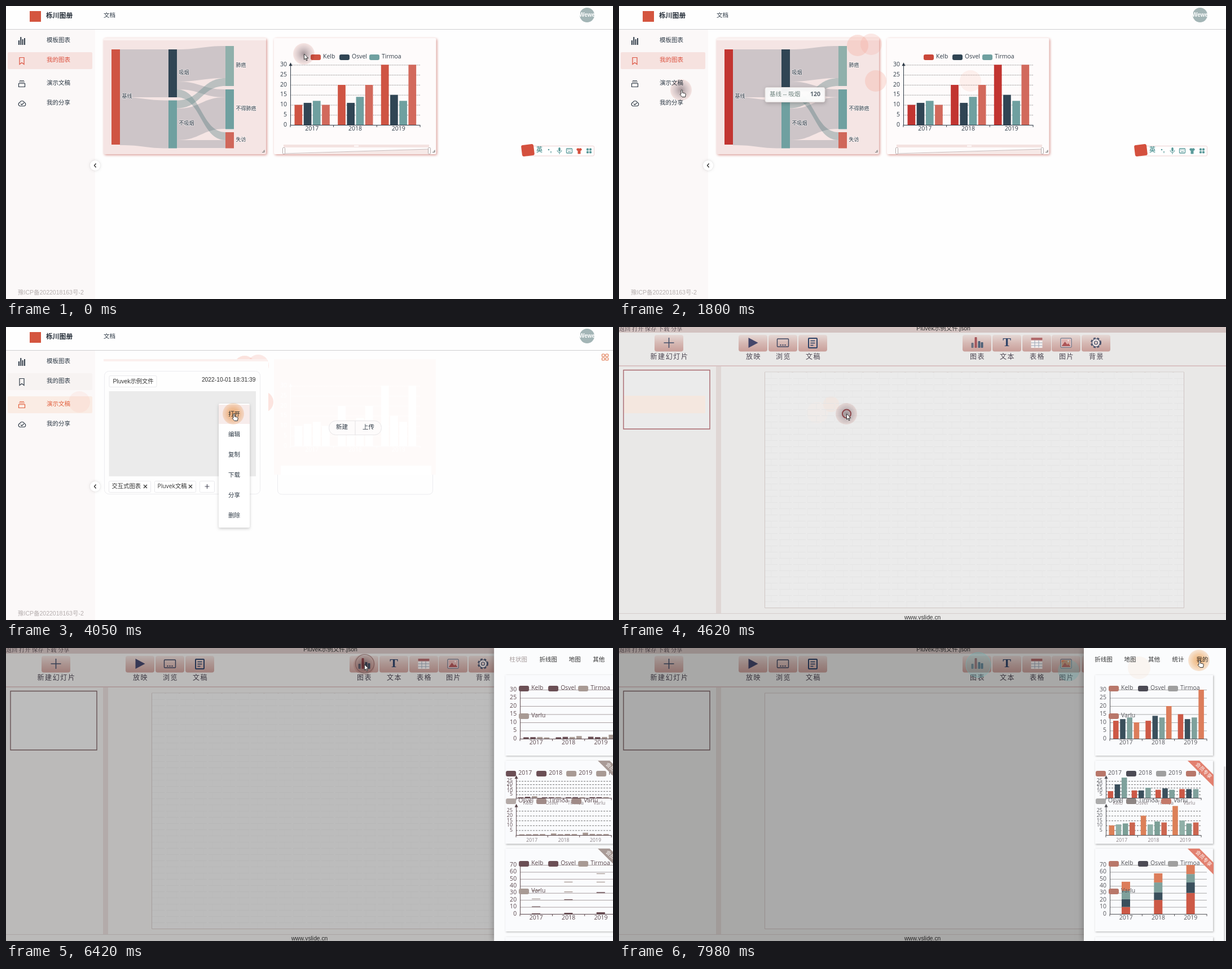
Write an HTML page with a canvas that moves like this. It is 1076 px wide and 520 px high and loops after 8 s.

```html
<!DOCTYPE html>
<html lang="zh">
<head>
<meta charset="utf-8">
<style>
html, body { margin: 0; width: 100%; height: 100%; overflow: hidden; background: #fefefe; }
canvas { display: block; }
</style>
</head>
<body>
<canvas id="stage" width="1076" height="520"></canvas>
<script>
const ctx = document.getElementById('stage').getContext('2d');
const LOOP = 8000;
const SANS = '"Open Sans", "Noto Sans CJK SC", "Noto Sans CJK", sans-serif';
const ARIAL = '"Liberation Sans", "Noto Sans CJK SC", "Noto Sans CJK", sans-serif';
const BRANDS = ['Kelb', 'Osvel', 'Tirmoa', 'Varlu'];
const YEARS = ['2017', '2018', '2019'];
const APP = 'Pluvek';
const INK = '#2f3b47', RED = '#cf5443', TEAL = '#6fa0a0', DARK = '#304554';

// ---- drawing helpers ----
function rect(x, y, w, h, fill, r = 0, stroke, lw = 1) {
  ctx.beginPath();
  ctx.roundRect(x, y, w, h, r);
  paint(fill, stroke, lw);
}
function circle(x, y, r, fill, stroke, lw = 1) {
  ctx.beginPath();
  ctx.arc(x, y, r, 0, 7);
  paint(fill, stroke, lw);
}
function paint(fill, stroke, lw) {
  if (fill) { ctx.fillStyle = fill; ctx.fill(); }
  if (stroke) { ctx.strokeStyle = stroke; ctx.lineWidth = lw; ctx.stroke(); }
}
function line(x1, y1, x2, y2, color, lw = 1, dash = []) {
  ctx.setLineDash(dash);
  ctx.beginPath();
  ctx.moveTo(x1, y1);
  ctx.lineTo(x2, y2);
  paint(null, color, lw);
  ctx.setLineDash([]);
}
function path(d, x, y, fill, stroke, lw = 1) {
  ctx.save();
  ctx.translate(x, y);
  const p = new Path2D(d);
  if (fill) { ctx.fillStyle = fill; ctx.fill(p); }
  if (stroke) { ctx.strokeStyle = stroke; ctx.lineWidth = lw; ctx.stroke(p); }
  ctx.restore();
}
function text(s, x, y, size = 10.5, color = INK, { align = 'left', font = SANS, weight = '', gap = 0 } = {}) {
  ctx.font = `${weight} ${size}px ${font}`;
  ctx.textAlign = align;
  ctx.textBaseline = 'middle';
  ctx.letterSpacing = gap + 'px';
  ctx.fillStyle = color;
  ctx.fillText(s, x, y);
  ctx.letterSpacing = '0px';
}
function shadowed(color, blur, dx, dy, draw) {
  ctx.save();
  Object.assign(ctx, { shadowColor: color, shadowBlur: blur, shadowOffsetX: dx, shadowOffsetY: dy });
  draw();
  ctx.restore();
}
const clamp = v => Math.max(0, Math.min(1, v));

// ---- bar charts ----
function chart(o) {
  const { x, w, base, unit, max, step, cats, rows, colors, grow = 1, ink = INK, grid = '#a3a3a3', size = 10.5 } = o;
  const top = base - max * unit, catW = w / cats.length;
  for (let v = o.from || 0; v <= (o.labelMax || max); v += step) {
    const y = base - v * unit;
    if (v) line(x, y + .5, x + w, y + .5, grid, 1, o.dash || [2, 1]);
    text(v, x - 6, y, size, ink, { align: 'right' });
  }
  rows.forEach((row, i) => {
    let stacked = 0;
    row.forEach((v, j) => {
      const h = v * unit * grow;
      const left = x + i * catW + o.offset + (o.stack ? 0 : j * o.pitch);
      rect(left, base - stacked * unit - h, o.barW, h, colors[j]);
      if (o.stack) stacked += v;
    });
    text(cats[i], x + (i + .5) * catW, base + (o.catDy || 7), o.catSize || size, o.catInk || ink, { align: 'center' });
  });
  line(x, base + .5, x + w, base + .5, ink);
  line(x + .5, top, x + .5, base, ink);
  for (let i = 0; i <= cats.length; i++) line(x + i * catW, base, x + i * catW, base + 4, ink);
  if (o.arrow) path('M-3 2L0 -4L3 2Z', x + .5, top, ink);
}
function legend(items, xs, y, colors, ink) {
  items.forEach((s, i) => {
    rect(xs[i], y - 5, 18, 10, colors[i], 3);
    text(s, xs[i] + 22, y - .5, 10.5, ink);
  });
}
const pageChart = {
  x: 504, w: 230, base: 211, unit: 3.555, max: 30, step: 5, cats: YEARS, arrow: true,
  rows: [[10, 11, 12, 10], [20, 11, 14, 20], [30, 15, 12, 30]], barW: 13.7, pitch: 16.2, offset: 7.5
};

// ---- sankey: node = x, y, height, colour, label; link = from, y, to, y, thickness ----
const NODES = [
  [187, 77, 169, RED, '基线'], [288, 77, 85, DARK, '吸烟'], [288, 167.5, 85, TEAL, '不吸烟'],
  [389, 71, 71, '#8fb0ab', '肺癌'], [389, 148, 70.5, TEAL, '不得肺癌'], [389, 224, 28.5, '#d0675a', '失访']
];
const LINKS = [
  [0, 77, 1, 77, 85], [0, 162, 2, 167.5, 85], [1, 77, 3, 71, 57], [1, 134, 4, 148, 14],
  [1, 148, 5, 224, 14], [2, 167.5, 3, 128, 14], [2, 182, 4, 162, 56], [2, 238, 5, 238, 14]
];
function sankey(t) {
  const hover = t >= 600 && t < 1000;
  LINKS.forEach(([a, y1, b, y2, h], i) => {
    const x1 = NODES[a][0] + 15, x2 = NODES[b][0], m = (x1 + x2) / 2;
    const tint = !hover && (i === 4 || i === 5);
    ctx.globalAlpha = hover && b !== 3 ? .04 : 1;
    path(`M${x1} ${y1}C${m} ${y1} ${m} ${y2} ${x2} ${y2}V${y2 + h}C${m} ${y2 + h} ${m} ${y1 + h} ${x1} ${y1 + h}Z`,
      0, 0, tint ? 'rgba(105,140,140,.42)' : 'rgba(49,69,84,.2)');
  });
  NODES.forEach(([x, y, h, color, label], i) => {
    ctx.globalAlpha = hover && ![1, 2, 3].includes(i) ? .08 : 1;
    const fill = i === 0 && t >= 100 ? '#c23531' : i === 3 && hover ? '#a9d0bb' : color;
    rect(x, y, 15, h, fill);
    ctx.strokeStyle = 'rgba(255,255,255,.6)';
    ctx.lineWidth = 1.5;
    ctx.font = `9px ${SANS}`;
    ctx.textAlign = 'left';
    ctx.textBaseline = 'middle';
    ctx.strokeText(label, x + 18.5, y + h / 2 - 1);
    text(label, x + 18.5, y + h / 2 - 1, 9);
  });
  ctx.globalAlpha = 1;
}
function tooltip(x, y, w, label, value, border) {
  shadowed('rgba(0,0,0,.2)', 6, 1, 2, () => rect(x, y, w, 26, 'rgba(255,255,255,.95)', 3, border));
  text(label, x + 8, y + 12.5, 10.5, '#6d807c');
  text(value, x + w - 8, y + 12.5, 10.5, '#5c6670', { align: 'right', weight: 'bold' });
}

// ---- dashboard pages ----
function frameParts(t) {
  const slides = t >= 2200;
  rect(0, 0, 1076, 520, '#fefefe');
  rect(0, 42, 158, 478, '#fbf8f8');
  line(0, 41.5, 1076, 41.5, '#cfcfd1');
  rect(42, 9, 20, 19, '#d4553f');
  text('栎川图册', 71, 18, 11.8, '#222b36', { weight: 'bold' });
  text('文档', 173, 17);
  circle(1030, 16, 13, '#a3b5b6');
  text('Wewe', 1030, 16, 10, '#fff', { align: 'center', font: ARIAL, weight: 'bold' });

  const active = '#dc5340';
  if (t < 2720) rect(3, 82, 150, 30, '#f6e2df', 2);
  else {
    rect(3, 82, 150, 30, '#f7f3f2', 2);
    rect(3, 123, 150, 30, '#faece4', 2);
  }
  const mineInk = slides ? INK : active, slideInk = slides ? '#e2613f' : INK;
  text('模板图表', 72, 61.5);
  text('我的图表', 72, 96.5, 10.5, mineInk);
  text('演示文稿', 72, 137, 10.5, slideInk);
  text('我的分享', 72, 172);
  path('M0 6h2v8h-2zM3.3 0h2v14h-2zM6.6 4h2v10h-2zM10 2h2v12h-2z', 22, 55, INK);
  path('M.5 .5h8v12l-4 -3l-4 3z', 23.5, 91, null, mineInk, 1.2);
  path('M2 .5h8M1 3h10M.5 5.5h11v6h-11z', 22, 132, null, slideInk, 1.2);
  path('M3.5 10.5a3.3 3.3 0 0 1 0 -6.3a4.3 4.3 0 0 1 8 0a3.3 3.3 0 0 1 0 6.3zM5 6.5l2 2l3.5 -3.5', 21, 167, null, INK, 1.2);
  text('豫ICP备2022018163号-2', 21, 509, 10.5, '#b5aeae', { font: ARIAL });
  shadowed('rgba(0,0,0,.15)', 4, 0, 0, () => circle(158, 283, 9, '#fff'));
  path('M3 0L0 3.5L3 7', 156.5, 279.5, null, '#222', 1.2);
}
function inputBar(t) {
  rect(922, 248.5, 120.5, 17.5, '#fff', 2, '#ecd0d0');
  ctx.save();
  ctx.translate(925, 256);
  ctx.rotate(-.12);
  rect(-11, -10, 22, 20, '#d4503e', 3);
  ctx.restore();
  const c = '#5b9a9a';
  text('英', 940, 256.5, 11, c, { weight: 'bold' });
  circle(962, 255, 1.3, c);
  path('M0 0h2l-1 4z', 965, 258, c);
  rect(979.3, 251, 3.5, 7, c, 2);
  path('M0 4a3.8 3.8 0 0 0 7.6 0M3.8 8v3', 977.2, 252, null, c, 1.1);
  rect(993.5, 253, 10, 8, null, 1, c, 1.3);
  line(995, 255.5, 1002, 255.5, c, 1, [1.5, 1]);
  line(996, 258.5, 1001, 258.5, c);
  path('M3 0q2 2 4 0l3 2l-1.5 3l-1 -.5v6h-5v-6l-1 .5l-1.5 -3z', 1011, 252, t < 500 ? '#d4503e' : t < 1000 ? '#888' : c);
  for (let i = 0; i < 4; i++) rect(1029 + i % 2 * 5, 252.5 + (i >> 1) * 5, 4, 4, c, 1.3);
}
function trail(x, y, alpha) { circle(x, y, 19, `rgba(243,165,150,${alpha})`); }
function pathTrails() { trail(423, 70, .32); trail(447, 68, .24); trail(455, 133, .3); }

function resizeCorner(x, y) { path('M0 4h4V0M2 2h2', x, y, null, '#777'); }
function chartsPage(t) {
  const shade = 'rgba(190,80,70,.6)';
  shadowed(shade, 4, 1.5, 1.5, () => rect(173, 57, 288, 206, '#f5e5e4', 2));
  rect(173, 57, 288, 4, '#fbf3f2');
  shadowed(shade, 4, 1.5, 1.5, () => rect(475, 57, 287.5, 206, '#fefbfb', 2));
  sankey(t);
  resizeCorner(454, 255.5);
  resizeCorner(756, 255.5);

  const red = t < 100 ? RED : '#c23531';
  chart({ ...pageChart, colors: [red, DARK, TEAL, '#d2695c'] });
  legend(BRANDS.slice(0, 3), [540, 591, 644], 91, [t < 100 ? RED : '#ca4739', DARK, TEAL], INK);
  rect(492, 246, 258, 5, '#f4e3e1');
  rect(617, 247.5, 8, 2, '#fff');
  path('M492 263L750 254V263Z', 0, 0, '#f6e9e7');
  line(492, 262, 750, 254, '#c9bdbd');
  rect(490.5, 251.5, 4, 11, '#fff', 1, '#b5aaaa');
  rect(748.5, 251.5, 4, 11, '#fff', 1, '#b5aaaa');
  inputBar(t);
  if (t >= 500) pathTrails();
  if (t >= 1500) trail(623, 133, .15);
  if (t >= 600 && t < 1000) tooltip(242, 182.5, 70, '肺癌', '100', '#a9d0bb');
  if (t >= 1600) tooltip(259, 144.5, 106, '基线 -- 吸烟', '120', '#e3dcdb');
}
function tag(label, x, w) {
  rect(x + .5, 273.5, w, 20, '#fff', 2, '#e9e9ec');
  text(label, x + 5.5, 283, 10.3, '#333');
  path('M0 0l6 6M6 0l-6 6', x + w - 12, 280, null, '#333', 1.2);
}
function slidesPage(t) {
  pathTrails();
  rect(173, 61, 292, 120, '#fefefe');
  rect(173, 57, 290, 4, '#fbf0ee');
  rect(475, 57, 287, 205, '#fefaf9');
  chart({ ...pageChart, ink: '#fff', grid: '#fff', colors: Array(4).fill('#fff') });
  rect(487, 246, 267, 20, '#fff');
  rect(481.5, 262, 275, 35, '#fefefe', [0, 0, 8, 8]);
  path('M0 0V27Q0 35 8 35H267Q275 35 275 27V0', 481.5, 262, null, '#ececef');
  rect(572.5, 166.5, 93, 25, '#fdfbfb', 12, '#e8e6e8');
  line(619, 167, 619, 191, '#e4e2e4');
  text('新建', 585, 178.5);
  text('上传', 632, 178.5);
  for (let i = 0; i < 4; i++) rect(1056.5 + i % 2 * 6.5, 48 + (i >> 1) * 6.5, 4.5, 4.5, null, 1, '#e0784f', 1.2);

  rect(174.5, 78.5, 276, 218, '#fefefe', 8, '#ececef');
  rect(183, 86.5, 84, 20, '#fff', 2, '#e9e9ec');
  text(APP + '示例文件', 189.5, 97, 10.3, '#333', { font: ARIAL });
  text('2022-10-01 18:31:39', 442.5, 94, 10.3, '#333', { font: ARIAL, align: 'right' });
  rect(182.5, 114, 260.5, 151, '#ebebeb');
  tag('交互式图表', 182, 74);
  tag(APP + '文稿', 263, 73);
  rect(343.5, 273.5, 26, 20, '#fff', 2, '#e9e9ec');
  path('M4 0v8M0 4h8', 352.5, 279, null, '#445', 1.1);
  trail(130, 133, .12);
  if (t < 3100) circle(108.5, 133, 15.5, null, '#e8837a', 2);
  if (t >= 3650) {
    shadowed('rgba(0,0,0,.2)', 5, 0, 2, () => rect(377, 136, 55, 220, '#fff', 2));
    if (t >= 3750) rect(377, 138, 55, 34, '#f7eceb');
    ['打开', '编辑', '复制', '下载', '分享', '删除'].forEach((s, i) => text(s, 404.5, 155 + i * 36, 10.5, INK, { align: 'center' }));
  }
}

// ---- slide editor ----
const TOOLS = [
  [63, '新建幻灯片', c => path('M0 -9V9M-9 0H9', c, 28, null, '#44506a', 1.6)],
  [212, '放映', c => path('M-8 -9L9 0L-8 9Z', c, 28, '#44466a')],
  [265, '浏览', c => {
    rect(c - 10, 21, 20, 14, null, 1, '#3c4560', 1.4);
    line(c - 5, 32, c + 6, 32, '#3c4560', 2, [2, 2]);
  }],
  [318, '文稿', c => {
    rect(c - 7.5, 20, 15, 17, null, 1, '#2f4468', 2);
    path('M-4 -4h8M-4 0h8M-4 4h5', c, 28.5, null, '#2f4468', 1.6);
  }],
  [609, '图表', c => [[-9, 9, '#6a7080'], [-3, 19, '#a5545a'], [3, 12, '#4d6078'], [8, 10, '#4d6078']].forEach(
    ([dx, h, f]) => rect(c + dx - 1, 37 - h, 4, h, f, 1))],
  [662, '文本', c => text('T', c, 28.5, 22, '#2f4468', { align: 'center', font: '"Liberation Serif", serif', weight: 'bold' })],
  [715, '表格', c => {
    rect(c - 10, 19, 20, 18, '#f4efee');
    rect(c - 10, 19, 20, 4.5, '#b0696b');
    path('M-10 0h20M-10 5h20M-3.5 -4.5v13M3.5 -4.5v13', c, 28, null, '#9aa5b5');
  }],
  [767, '图片', (c, bright) => {
    rect(c - 9.5, 20, 19, 16, '#f1e6e5', 1, '#4d5670');
    rect(c - 8, 21.5, 16, 13, bright ? '#e8845a' : '#dfb3b0');
    path('M-8 6L-2 -2L2 3L4 1L8 6Z', c, 28, bright ? '#ca3c34' : '#ad5557');
    circle(c + 4, 24, 1.5, '#f4e6e2');
  }],
  [820, '背景', c => {
    ctx.setLineDash([4, 3]);
    circle(c, 28, 8.5, null, '#45506a', 2);
    ctx.setLineDash([]);
    circle(c, 28, 7, '#f0e6e5', '#45506a', 1.2);
    circle(c, 28, 3, '#e2cbc8', '#45506a', 1.2);
  }]
];
function bricks() {
  for (let row = 0; row < 38; row++) {
    const y = 80.5 + row * 11;
    line(259, y, 1001, y, '#e4e4e4', 1, [22, 3]);
    for (let x = 270 + row % 2 * 16; x < 1000; x += 32) line(x, y, x, Math.min(y + 11, 498), '#e7e7e7');
  }
}
function editor(t) {
  const label = { font: ARIAL, align: 'center' };
  rect(0, 0, 1076, 520, '#e9e8e7');
  rect(0, 0, 1076, 10, '#d3c3c1');
  text('返回 打开 保存 下载 分享', 0, 3, 10.2, '#4d4048', { font: '"Noto Serif CJK SC", "Noto Sans CJK SC", "Noto Sans CJK", serif' });
  text(APP + '示例文件.json', 575, 3.5, 10.5, '#333', label);
  const skin = ctx.createLinearGradient(0, 14, 0, 43);
  skin.addColorStop(0, '#e5d8d5');
  skin.addColorStop(.5, '#d6b9b4');
  skin.addColorStop(1, '#c99f9a');
  for (const [x, name, icon] of TOOLS) {
    rect(x, 14, 51, 29.5, skin, 4);
    icon(x + 25.5, t >= 7020);
    text(name, x + 26.5, 53.5, 12, '#4b4450', { align: 'center', gap: 1.6 });
  }
  line(0, 69, 1076, 69, '#c9a09f', 1.2);
  rect(172, 70, 9, 438, '#dfd6d4');
  rect(258.5, 80, 743, 418.5, '#ebebeb', 0, '#cfc5c3');
  rect(8, 76.5, 153, 104.5, '#ebebeb', 0, t < 6220 ? '#a9676d' : '#7f6668', 1.4);
  if (t < 5000) {
    rect(9, 122, 144, 31, '#f4e7df');
    circle(352, 152, 19, '#efebe9');
    circle(376, 137, 14, '#f0e7e2');
  }
  if (t < 7020) bricks();
  line(0, 508.5, 1076, 508.5, '#d6cecd');
  text('www.vslide.cn', 538, 516.5, 10.3, '#333', label);
  if (t < 4820) circle(403.5, 154, 7.5, null, '#ad5b60', 2);
}

// ---- chart drawer ----
const SETS = [[11, 12, 13, 10], [11, 14, 13, 20], [15, 12, 13, 30]];
const BY_YEAR = [[10, 11, 12, 13], [20, 11, 14, 13], [30, 15, 12, 13]];
const BY_BRAND = BRANDS.map((_, j) => BY_YEAR.map(row => row[j]));
function ribbon(y, color) {
  path('M1008 0H1029L1054 25V46Z', 0, y, color);
  ctx.save();
  ctx.translate(1036, y + 18);
  ctx.rotate(Math.PI / 4);
  text('会员专享', 0, 0, 9, '#fff', { align: 'center' });
  ctx.restore();
}
function drawer(t) {
  const age = t - 6220, muted = t < 6520;
  rect(0, 0, 1076, 520, `rgba(0,0,0,${.28 * clamp(age / 280)})`);
  if (age >= 0 && age < 700) circle(636, 28, 16.5, null, 'rgba(110,80,80,.65)', 1.2);
  if (t >= 7020) {
    circle(637, 30, 22, 'rgba(110,165,165,.3)', 'rgba(110,180,180,.6)');
    circle(797, 40, 19, 'rgba(100,165,165,.32)');
  }
  ctx.save();
  ctx.translate(252 * Math.pow(1 - clamp(age / 300), 1.65), 0);
  shadowed('rgba(0,0,0,.25)', 10, -2, 0, () => rect(824, 0, 252, 520, '#fbfcfd'));

  const ink = muted ? '#5c484d' : '#55555a';
  const colors = muted ? ['#6b4f55', '#6b4f55', '#a89a94', '#a89a94'] : ['#cd5946', '#3a4f5c', '#7fa19c', '#dc7d5b'];
  const lateColors = muted ? Array(4).fill('#a89a94') : ['#dc8058', '#90b0a8', '#7b9f96', '#cc6650'];
  const marks = muted ? colors : ['#b8776a', '#4c4b55', '#9f9f9f', '#b8776a'];
  const band = muted ? '#a89a96' : '#e2806f';
  const grow = t < 6392 ? 0 : 1 - Math.pow(1 - clamp((t - 6392) / 1000), 3);
  for (const [y, h] of [[48, 143], [200, 147.5], [356, 147], [513, 20]])
    shadowed('rgba(0,0,0,.3)', 3, 1, 1, () => rect(844, y, 209, h, '#fafbfd'));

  const shared = { colors, grow, ink, grid: muted ? '#aaa0a2' : '#aaa', barW: 9.6, pitch: 12.2 };
  const wide = { ...shared, x: 870, w: 172, cats: YEARS, dash: [] };
  const small = { ...shared, x: 863, w: 169, max: 30, from: 5, step: 5, labelMax: 25, size: 9, catSize: 8.7, catInk: '#8a8084',
    grid: '#777', dash: [3, 2], arrow: true, catDy: 10 };

  chart({ ...wide, rows: SETS, base: 161, unit: 2.9, max: 30, step: 5, offset: 6 });
  legend(BRANDS, [868, 920, 973], 72, marks, ink);
  legend([BRANDS[3]], [868], 121, [marks[3]], ink);

  chart({ ...small, base: 266, unit: 1.2, cats: BRANDS, rows: BY_BRAND, offset: 3.5 });
  chart({ ...small, base: 332, unit: 1.72, cats: YEARS, rows: BY_YEAR, offset: 5.5, colors: lateColors });
  legend([...YEARS, BRANDS[0][0]], [845, 899, 952, 1005], 223, marks, ink);
  legend(BRANDS.slice(1), [845, 899, 961], 272, muted ? ['#b3a9a6', '#a08b88', '#a08b88'] : ['#ababab', '#8d8583', '#c4796a'], ink);

  chart({ ...wide, rows: BY_YEAR, base: 472, unit: 1.243, max: 70, step: 10, offset: 21, barW: 15, stack: true });
  legend(BRANDS, [868, 920, 973], 383, marks, ink);
  legend([BRANDS[3]], [868], 432, [marks[3]], ink);
  ribbon(200, band);
  ribbon(356, band);
  rect(1072, 210, 3, 310, '#dcdcde', 1.5);

  if (t >= 7520) circle(922, 35, 20, 'rgba(245,215,190,.2)');
  ctx.beginPath();
  ctx.rect(841, 0, 215, 44);
  ctx.clip();
  const scroll = 61 * clamp((t - 7120) / 300);
  [['柱状图', 867], ['折线图', 920], ['地图', 967], ['其他', 1009.5], ['统计', 1052], ['我的', 1095]].forEach(
    ([s, x], i) => text(s, x - scroll, 21, 10.5, i ? '#333' : '#a59a9a', { align: 'center' }));
  ctx.restore();
}

// ---- pointer: time, x, y ----
const POINTER = [
  [0, 528, 85], [100, 528, 85], [300, 455, 133], [400, 447, 68], [500, 423, 70], [600, 375, 101], [900, 375, 101],
  [1200, 623, 133], [1300, 623, 133], [1600, 250, 128], [1800, 110, 149], [1900, 130, 133], [2000, 108, 133],
  [2620, 108, 133], [2820, 352, 152], [3050, 352, 152], [3250, 411, 140], [3450, 375, 135], [3650, 375, 135],
  [3850, 403, 154], [4720, 403, 154], [5220, 470, 119], [5320, 470, 119], [6120, 635, 28], [6620, 635, 30],
  [7020, 797, 40], [7120, 861, 22], [7420, 920, 34], [7520, 907, 24], [7780, 907, 24], [7980, 1028, 22], [8000, 1028, 22]
];
function pointer(t) {
  const i = POINTER.findIndex(k => k[0] > t);
  const [t0, x0, y0] = POINTER[i - 1], [t1, x1, y1] = POINTER[i];
  const p = (t - t0) / (t1 - t0), x = x0 + (x1 - x0) * p, y = y0 + (y1 - y0) * p;
  const within = (a, b) => t >= a && t < b;
  const hand = within(300, 1000) || within(1500, 4420) || t >= 7120;
  const warm = within(300, 1000) || within(2200, 4420) || t >= 7020;
  const halo = ctx.createRadialGradient(x, y, 2, x, y, 19);
  const stops = warm ? ['rgba(240,172,105,.85)', 'rgba(244,190,135,.75)', 'rgba(248,215,185,.6)']
    : ['rgba(135,115,120,.65)', 'rgba(180,155,158,.5)', 'rgba(238,205,200,.45)'];
  stops.forEach((c, j) => halo.addColorStop(j / 2, c));
  // Multiplying keeps the text below the halo readable.
  ctx.globalCompositeOperation = 'multiply';
  circle(x, y, 19, halo);
  ctx.globalCompositeOperation = 'source-over';
  if (hand) path('M0 1a1.2 1.2 0 0 1 2.4 0V5L7.2 6.1Q8.4 6.5 8.2 8L7.4 12.5H2L-1.8 8.4Q-2 6.6 0 7.4Z', x, y, '#fff', '#333');
  else path('M0 0V10L2.5 8L4 12L5.6 11.3L4 7.5H7.3Z', x + .5, y, '#fff', '#333');
}

const CLOCKS = [7780, 4420, 4150, 3450, 2620, 0];
function render() {
  const now = performance.now() % LOOP;
  const start = CLOCKS.find(c => c <= now);
  const t = start + Math.floor((now - start) / 100) * 100;
  if (t < 4420) {
    frameParts(t);
    (t < 2200 ? chartsPage : slidesPage)(t);
  } else {
    editor(t);
    if (t >= 6220) drawer(t);
  }
  pointer(t);
  requestAnimationFrame(render);
}
render();
</script>
</body>
</html>
```
